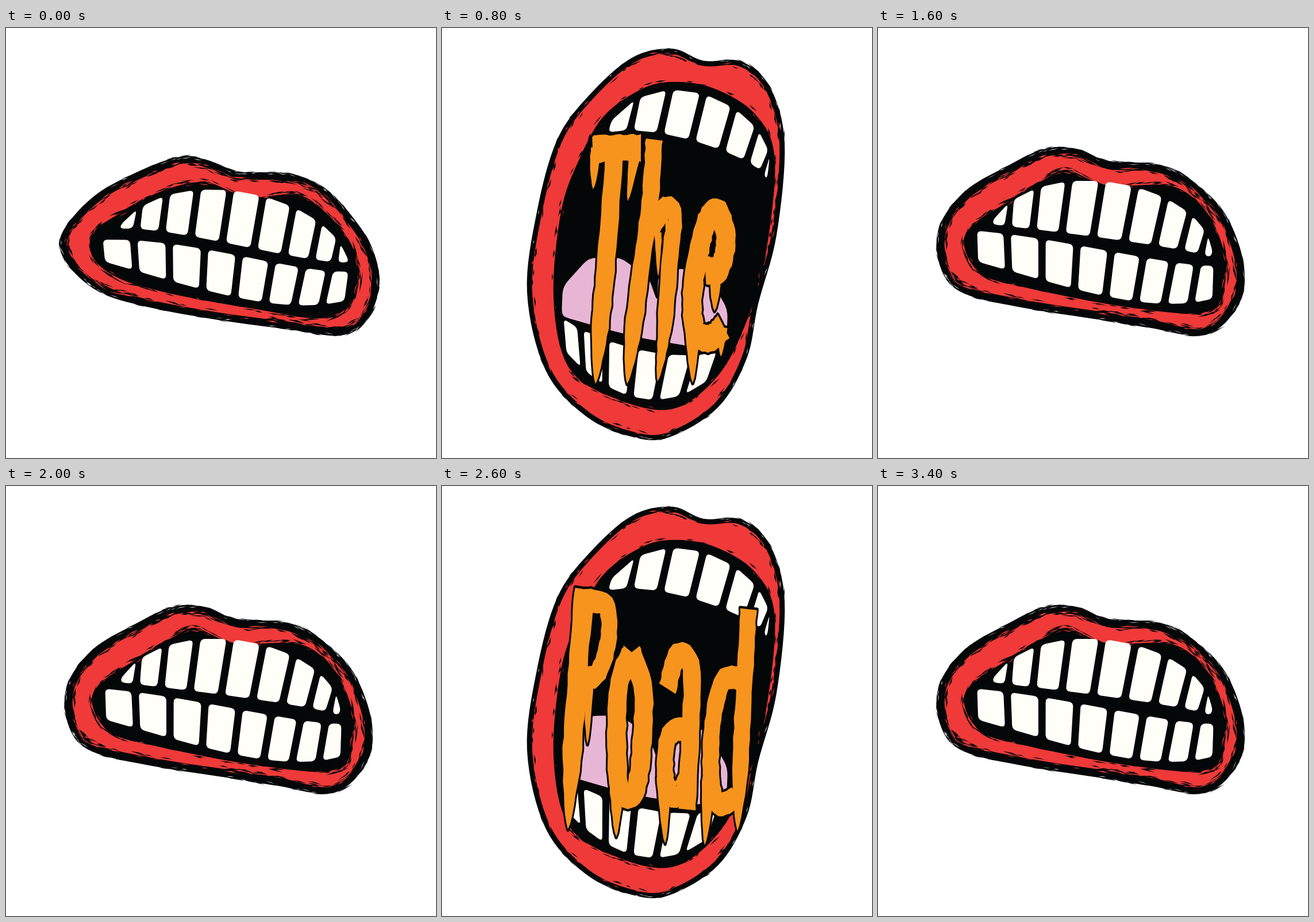
Animation of 748x748 px, one loop 3.6 s. Source, as an HTML page with a canvas:

```html
<!DOCTYPE html>
<html lang="en">
<head>
<meta charset="utf-8">
<title>Mouth</title>
<style>
html, body { margin: 0; width: 100%; height: 100%; overflow: hidden; background: #fff; }
canvas { display: block; width: 748px; height: 748px; }
</style>
</head>
<body>
<canvas id="stage" width="748" height="748"></canvas>
<script>
const ctx = document.getElementById('stage').getContext('2d');
const BLACK = '#040708', RED = '#ef3a39', WHITE = '#fff', TOOTH = '#fffef8', PINK = '#e8b6d5', ORANGE = '#f7941e';
const STEP = 200;

// Key points of each pose. A row of teeth lies between a gum and a bite curve.
const shut = {
  rough: 1, rim: 13,
  outer: '300,224 345,228 390,246 415,251 490,253 550,275 600,325 638,385 649,450 626,510 580,535 490,524 370,508 245,485 160,458 105,408 96,360 150,295 225,252',
  hole: '345,268 420,294 505,290 555,320 600,375 614,440 590,488 540,505 440,490 300,465 200,437 152,400 152,355 210,316 270,284',
  rows: [
    { teeth: 9, gum: '196,345 333,281 500,311 598,408', bite: '192,349 322,362 484,394 600,408' },
    { teeth: 8, gum: '166,405 323,450 468,480 595,474', bite: '162,368 325,381 481,411 602,424' }
  ]
};
const clench = {
  rough: 1, rim: 14,
  outer: '290,210 345,210 400,231 490,238 550,268 605,325 636,410 628,480 570,534 470,521 390,508 260,488 150,462 110,420 105,350 150,285 225,240',
  hole: '330,248 400,274 510,275 570,318 602,390 602,450 570,495 430,485 250,450 180,428 150,380 165,342 230,300 290,263',
  rows: [
    { teeth: 9, gum: '196,338 332,266 500,295 584,396', bite: '194,341 320,356 481,378 584,400' },
    { teeth: 8, gum: '168,405 323,449 465,478 588,470', bite: '166,352 326,374 479,402 590,414' }
  ]
};
const open = {
  rough: 0.6, rim: 9,
  outer: '350,108 400,125 440,138 500,134 555,150 590,198 606,300 600,440 555,550 500,612 430,637 350,639 270,608 200,556 145,440 158,330 190,250 290,132',
  hole: '380,164 450,174 510,174 555,225 586,360 570,480 510,562 430,604 350,600 240,557 195,490 189,400 215,285 265,208 320,172',
  tongue: '203,425 205,365 240,345 310,343 350,360 400,408 440,379 480,390 520,430 542,480 520,498 440,492 380,488 290,457',
  rows: [
    { teeth: 6, gum: '285,218 386,176 497,186 556,290', bite: '288,238 372,240 475,270 542,310' },
    { teeth: 6, gum: '222,500 296,560 404,586 510,540', bite: '212,458 304,476 410,504 522,514' }
  ]
};
const wide = {
  rough: 0.5, rim: 9,
  outer: '400,36 455,57 520,58 570,102 596,200 582,360 550,480 530,575 480,660 395,712 330,711 250,675 180,595 148,460 165,320 200,195 255,118 330,52',
  hole: '395,94 470,104 545,150 579,230 562,400 530,510 480,605 400,663 300,644 220,590 194,470 207,320 238,230 280,155 340,110',
  tongue: '208,500 210,450 255,400 310,399 360,435 375,478 376,428 410,418 460,425 497,490 495,545 440,555 350,540 290,525 220,505',
  rows: [
    { teeth: 7, gum: '290,165 416,107 537,162 566,262', bite: '283,182 398,186 517,225 566,266' },
    { teeth: 6, gum: '212,560 284,622 372,648 465,612', bite: '206,503 285,543 388,568 484,562' }
  ]
};

// Letters are brush strokes: [width, path, share of the length that tapers to a drip].
const the = [
  [[32, '296,260 338,258 380,258'], [16, '301,258 297,308', 0.6], [18, '371,258 357,322', 0.7],
    [31, '334,260 320,392 309,474 301,543', 0.35]],
  [[29, '403,248 397,315 383,391 365,488 356,543', 0.3], [28, '398,355 420,332 437,340 429,405 419,488 409,540', 0.3],
    [12, '410,360 410,413', 0.8]],
  [[33, '492,406 516,404 528,370 516,337 496,345 482,380 470,435 474,478 500,488 524,474'], [18, '510,408 508,455', 0.6],
    [26, '470,470 470,542', 0.8], [16, '522,475 519,510', 0.8]]
];
const poad = [
  [[33, '258,238 247,330 237,430 229,528', 0.3], [28, '255,252 295,258 299,300 280,340 252,345'], [16, '265,345 263,425', 0.7]],
  [[32, '340,314 319,350 314,420 320,480 346,480 357,430 360,360 340,314'], [24, '314,470 313,537', 0.8]],
  [[30, '402,358 420,318 444,335 442,410 436,504'], [28, '440,405 405,415 398,460 412,488 435,470'], [24, '396,465 398,545', 0.8]],
  [[28, '543,262 537,340 530,430 524,530', 0.25], [28, '528,345 498,350 481,400 478,460 490,497 520,490'], [24, '475,465 467,547', 0.8]]
];

// Placement: [scaleX, scaleY, x, y]
const ID = [1, 1, 0, 0];
const HALF = [1.013, 1.006, -3.9, -0.6];
const THE_TALL = [1, 1.44, -34, -163];
const POAD_TALL = [1, 1.44, -10, -163];

const steps = [
  [shut], [clench], [open, HALF],
  [open, ID, the, ID], [wide, ID, the, THE_TALL], [wide, [1.04, 0.977, -12.8, 14.8], the, THE_TALL], [open, ID, the, ID],
  [open, HALF], [clench],
  [shut], [clench], [open, HALF],
  [open, ID, poad, ID], [wide, ID, poad, POAD_TALL], [wide, [1.04, 0.977, -10, 6.8], poad, POAD_TALL], [open, ID, poad, [1, 1, -13, 0]],
  [open, HALF], [clench]
];

const parse = s => s.split(' ').map(p => p.split(',').map(Number));
const place = ([sx, sy, x, y]) => ctx.transform(sx, 0, 0, sy, x, y);
const lerp = (a, b, t) => a.map((v, k) => v + (b[k] - v) * t);
const dist = (a, b) => Math.hypot(a[0] - b[0], a[1] - b[1]);

function random(seed) {
  return () => (seed = (seed * 16807) % 2147483647) / 2147483647;
}

// Catmull-Rom curve sampled as [x, y, tangentX, tangentY].
function curve(text, closed) {
  const p = parse(text), n = p.length, out = [];
  const pick = i => closed ? p[(i + n) % n] : p[Math.max(0, Math.min(n - 1, i))];
  for (let i = 0; i < (closed ? n : n - 1); i++) {
    const q = [-1, 0, 1, 2].map(k => pick(i + k));
    for (let t = 0; t < 1; t += 0.125) {
      const at = k => {
        const [a, b, c, d] = q.map(v => v[k]);
        const u = c - a, v = 2 * a - 5 * b + 4 * c - d, w = 3 * b - a - 3 * c + d;
        return [b + t * (u + t * (v + t * w)) / 2, (u + 2 * t * v + 3 * t * t * w) / 2];
      };
      const [x, dx] = at(0), [y, dy] = at(1), len = Math.hypot(dx, dy) || 1;
      out.push([x, y, dx / len, dy / len]);
    }
  }
  if (!closed) out.push([...p[n - 1], ...out[out.length - 1].slice(2)]);
  return out;
}

// Cubic through four points spaced evenly in t.
function cubic(text) {
  const p = parse(text);
  return t => [0, 1].map(k => p.reduce((sum, v, i) => {
    let f = v[k];
    for (let j = 0; j < 4; j++) if (j !== i) f *= (3 * t - j) / (i - j);
    return sum + f;
  }, 0));
}

const inset = (pts, d) => pts.map(([x, y, tx, ty]) => [x - ty * d, y + tx * d, tx, ty]);

function fillPath(pts, color) {
  ctx.beginPath();
  pts.forEach(([x, y]) => ctx.lineTo(x, y));
  ctx.fillStyle = color;
  ctx.fill();
}

// Thin slivers along an edge; positive offsets lie inside it.
function bristle(pts, color, count, lo, hi, len, thick, rnd) {
  ctx.fillStyle = color;
  ctx.beginPath();
  for (let i = 0; i < count; i++) {
    const [x, y, tx, ty] = pts[Math.floor(rnd() * pts.length)];
    const off = lo + rnd() * (hi - lo), l = len * (0.35 + rnd() * 0.65), w = thick * (0.5 + rnd() * 0.5);
    const slant = (rnd() - 0.5) * 0.3;
    const ux = tx - ty * slant, uy = ty + tx * slant;
    const cx = x - ty * off, cy = y + tx * off;
    ctx.moveTo(cx - ux * l, cy - uy * l);
    ctx.lineTo(cx - ty * w, cy + tx * w);
    ctx.lineTo(cx + ux * l, cy + uy * l);
    ctx.lineTo(cx + ty * w * 0.4, cy - tx * w * 0.4);
    ctx.closePath();
  }
  ctx.fill();
}

function fillRound(p, r, color) {
  const n = p.length;
  const toward = (c, q) => lerp(c, q, Math.min(0.45, r / dist(c, q)));
  ctx.beginPath();
  p.forEach((c, i) => {
    ctx.lineTo(...toward(c, p[(i + n - 1) % n]));
    ctx.quadraticCurveTo(...c, ...toward(c, p[(i + 1) % n]));
  });
  ctx.fillStyle = color;
  ctx.fill();
}

function drawTeeth({ teeth, gum, bite }) {
  const edges = [cubic(gum), cubic(bite)];
  for (let i = 0; i < teeth; i++) {
    const [g, b] = edges.map(edge => {
      const a = edge(i / teeth), c = edge((i + 1) / teeth), gap = Math.min(0.3, 6.5 / dist(a, c));
      return [lerp(a, c, gap), lerp(c, a, gap)];
    });
    fillRound([g[0], g[1], b[1], b[0]], 8, TOOTH);
  }
}

function drawMouth({ rough, rim, outer, hole, tongue, rows }) {
  const rnd = random(7321), edge = curve(outer, true), lip = inset(edge, rim), inner = curve(hole, true);
  const len = 8 + 9 * rough;
  fillPath(edge, BLACK);
  bristle(edge, BLACK, 90 * rough, -1, 2, len, 1.6, rnd);
  bristle(edge, WHITE, 50 * rough, 0, 4, len * 0.6, 0.8, rnd);
  fillPath(lip, RED);
  bristle(lip, BLACK, 110 * rough, -1, 4, len, 2.2, rnd);
  bristle(lip, RED, 60 * rough, -4, 0, len * 0.8, 1.4, rnd);
  fillPath(inner, BLACK);
  bristle(inner, BLACK, 110 * rough, -5, 1, len, 2.2, rnd);
  bristle(inner, RED, 24 * rough, -1, 4, len * 0.6, 1, rnd);
  if (tongue) fillRound(parse(tongue), 14, PINK);
  rows.forEach(drawTeeth);
}

// Outline of a brush stroke with a slightly uneven edge.
function ribbon([width, path, taper = 0], rnd) {
  const pts = curve(path), last = pts.length - 1, left = [], right = [];
  pts.forEach(([x, y, tx, ty], i) => {
    const rest = 1 - i / last;
    const size = width / 2 * (rest < taper ? (rest / taper) ** 0.8 : 1);
    const a = size * (0.94 + rnd() * 0.14), b = size * (0.94 + rnd() * 0.14);
    left.push([x + ty * a, y - tx * a]);
    right.unshift([x - ty * b, y + tx * b]);
  });
  return [...left, ...right];
}

function drawWord(word) {
  const rnd = random(41);
  ctx.lineJoin = 'round';
  ctx.lineWidth = 6;
  ctx.strokeStyle = BLACK;
  for (const letter of word) {
    const strokes = letter.map(s => ribbon(s, rnd));
    for (const s of strokes) {
      fillPath(s, BLACK);
      ctx.closePath();
      ctx.stroke();
    }
    strokes.forEach(s => fillPath(s, ORANGE));
  }
}

function draw([mouth, fit = ID, word, spot]) {
  ctx.setTransform(1, 0, 0, 1, 0, 0);
  ctx.fillStyle = WHITE;
  ctx.fillRect(0, 0, 748, 748);
  place(fit);
  drawMouth(mouth);
  if (word) {
    place(spot);
    drawWord(word);
  }
}

const start = performance.now();
let shown = -1;
function tick() {
  const i = Math.floor((performance.now() - start) / STEP) % steps.length;
  if (i !== shown) draw(steps[shown = i]);
  requestAnimationFrame(tick);
}
tick();
</script>
</body>
</html>
```
